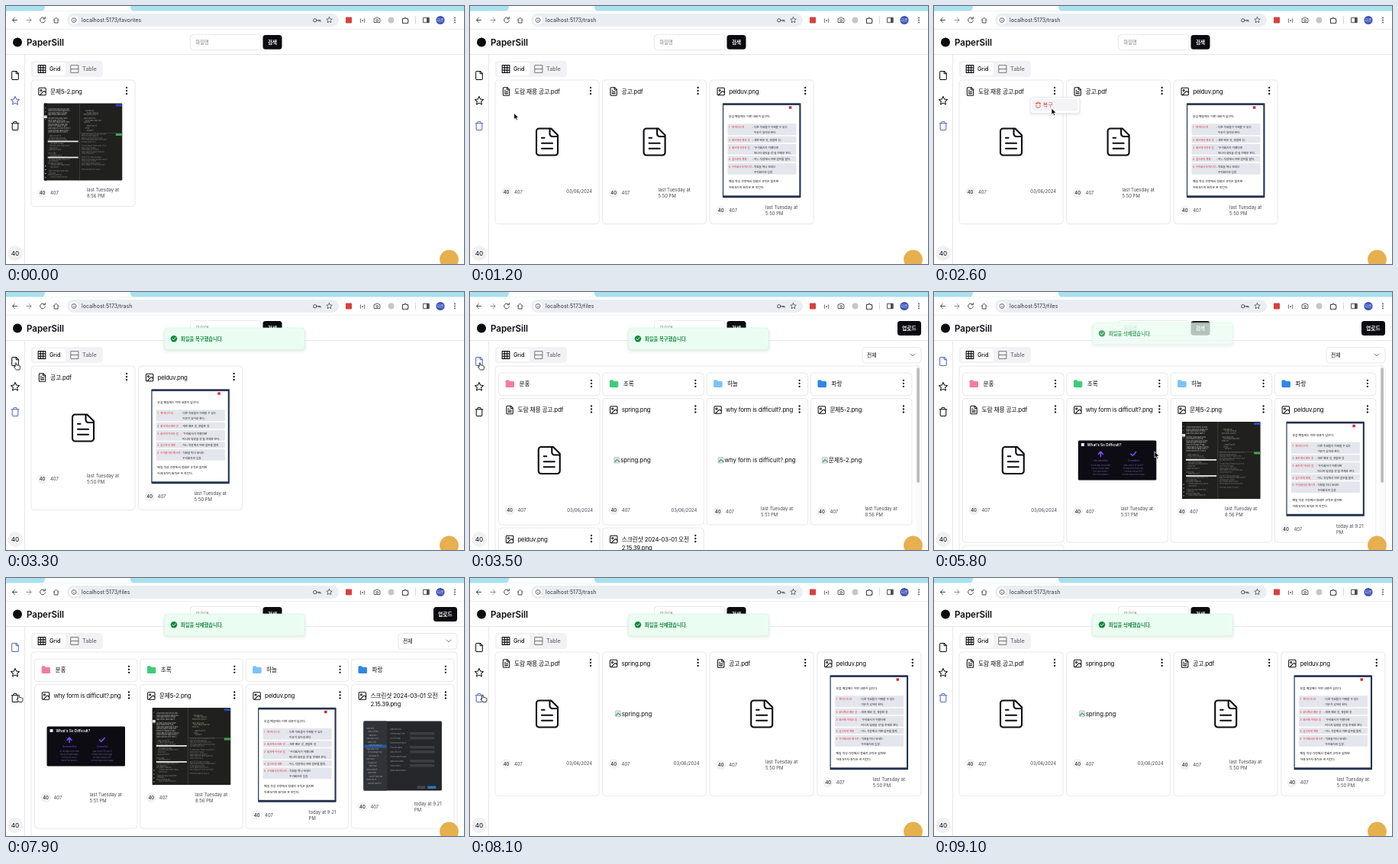
An HTML page for the animation above (9600 ms loop, 600x338 px).

```html
<!DOCTYPE html>
<html lang="ko">
<head>
<meta charset="utf-8">
<title>PaperSill</title>
<style>
html, body { margin: 0; width: 100%; height: 100%; overflow: hidden; background: #fff; }
svg { display: block; width: 100%; height: 100%; font-family: Inter, "Noto Sans CJK KR", "Noto Sans CJK", "Noto Sans KR", sans-serif; }
text { white-space: pre; }
</style>
</head>
<body>
<svg id="stage" viewBox="0 0 600 338" preserveAspectRatio="none">
  <g id="page"></g><g id="menu"></g><g id="toasts"></g><g id="cursor"></g>
</svg>
<script>
const LOOP = 9600;
const INK = '#0b0b10', LINE = '#e3e3e8', BLUE = '#5566c0', RED = '#dc2f35', MUTED = '#44464d';
const OWNER = '407', INITIALS = '40';
const $ = id => document.getElementById(id);

const rect = (x, y, w, h, fill, r = 0, more = '') =>
  `<rect x="${x}" y="${y}" width="${w}" height="${h}" rx="${r}" fill="${fill}" ${more}/>`;
const box = (x, y, w, h, r = 4, fill = '#fff') => rect(x, y, w, h, fill, r, `stroke="${LINE}" stroke-width=".8"`);
const dot = (x, y, r, fill) => `<circle cx="${x}" cy="${y}" r="${r}" fill="${fill}"/>`;
const text = (x, y, size, str, fill = INK, more = '') =>
  `<text x="${x}" y="${y}" font-size="${size}" fill="${fill}" ${more}>${str}</text>`;
const path = (d, stroke, w = 1, more = '') =>
  `<path d="${d}" fill="none" stroke="${stroke}" stroke-width="${w}" stroke-linecap="round" stroke-linejoin="round" ${more}/>`;
const at = (x, y, body) => `<g transform="translate(${x} ${y})">${body}</g>`;
const MID = 'text-anchor="middle"', BOLD = 'font-weight="600"', MEDIUM = 'font-weight="500"';

const SHEET = 'M15 2H6a2 2 0 0 0-2 2v16a2 2 0 0 0 2 2h12a2 2 0 0 0 2-2V7Z M14 2v4a2 2 0 0 0 2 2h4';
const ICONS = {
  file: SHEET,
  doc: SHEET + ' M10 9H8 M16 13H8 M16 17H8',
  star: 'M12 2 15.1 8.3 22 9.3 17 14.1 18.2 21 12 17.8 5.8 21 7 14.1 2 9.3 8.9 8.3Z',
  trash: 'M3 6h18 M19 6v14a2 2 0 0 1-2 2H7a2 2 0 0 1-2-2V6 M8 6V4a2 2 0 0 1 2-2h4a2 2 0 0 1 2 2v2',
  image: 'M5 3h14a2 2 0 0 1 2 2v14a2 2 0 0 1-2 2H5a2 2 0 0 1-2-2V5a2 2 0 0 1 2-2Z M7 9a2 2 0 1 0 4 0 2 2 0 1 0-4 0 M21 15l-3.1-3.1a2 2 0 0 0-2.8 0L6 21',
  grid: 'M3 3h18v18H3Z M3 9h18 M3 15h18 M9 3v18 M15 3v18',
  rows: 'M3 3h18v18H3Z M3 12h18',
  folder: 'M20 20a2 2 0 0 0 2-2V8a2 2 0 0 0-2-2h-7.9a2 2 0 0 1-1.7-.9L9.6 3.9A2 2 0 0 0 7.9 3H4a2 2 0 0 0-2 2v13a2 2 0 0 0 2 2Z'
};
const icon = (name, cx, cy, size, color = INK, w = 2, fill = 'none') =>
  `<g transform="translate(${cx - size / 2} ${cy - size / 2}) scale(${size / 24})">` +
  `<path d="${ICONS[name]}" fill="${fill}" stroke="${color}" stroke-width="${w}" stroke-linecap="round" stroke-linejoin="round"/></g>`;
const dots = (x, y) => [-4, 0, 4].map(d => dot(x, y + d, 1.15, INK)).join('');

// Thumbnails, each about 103 wide
function scribble(seed, count) {
  const words = ['const', 'value', 'return', 'item', 'if', 'the', 'list', 'of', 'map', 'next', 'index'];
  let out = '';
  while (out.length < count) {
    seed = (seed * 16807) % 2147483647;
    out += words[seed % words.length] + ' ';
  }
  return out.slice(0, count);
}

function codeShot() {
  let s = rect(0, 0, 102.5, 101, '#20211f', 1) + rect(0, 0, 4, 101, '#181917') + rect(46.5, 0, .6, 101, '#4b4c48');
  for (let i = 0; i < 36; i++) {
    const y = 8 + i * 2.55, n = (i * 7919) % 23;
    if (i % 9 !== 4) s += text(5.5 + (i > 12 ? n % 4 : 0), y, 2.1, scribble(i + 11, i < 13 ? 31 - n / 4 : 9 + n), i < 13 ? '#c9c9c4' : '#858680');
    if (i < 13) { if (i % 4) s += text(52 + (n % 3) * 2, y, 2.1, scribble(i + 71, 7 + n * .7), '#989c86'); }
    else if (i < 32 && i % 6) s += text(49, y, 2.1, scribble(i + 131, 18 + n * .85), '#7b7d77');
  }
  for (const y of [49, 70]) s += rect(5, y, 40, 1.8, '#e6e6e2');
  for (let i = 0; i < 4; i++) s += dot(2, 6 + i * 5, .7, '#777') + dot(2, 82 + i * 5, .8, '#aaa');
  return s + rect(0, 16, 4, 3.5, '#ddd') + rect(47, 39, 55.5, .5, '#50524c') +
    rect(94, 1, 8, 3, '#2c47c9', .6) + rect(94, 39.5, 8, 3, '#3fa64b', .6);
}

function slide() {
  const purple = '#7a4bf0';
  let s = rect(0, 0, 102.5, 52, '#0d0c13', 1.5) + rect(4, 3.5, 4, 4, '#e9e9ee') +
    text(12, 7.4, 4.7, 'What\'s So Difficult?', '#fff', BOLD) +
    path('M29.5 21v-6m-3 3 3-3.5 3 3.5', purple, 1.6) + path('M69 17.5l2.3 2.5 4.5-5', purple, 1.6) +
    text(29.5, 27.5, 3, 'Uncontrolled', purple, MID) + text(72.5, 27.5, 3, 'Controlled', purple, MID);
  for (let i = 0; i < 4; i++)
    s += text(29.5, 33.5 + i * 4, 2.3, scribble(i + 5, 26 - i * 2), '#6d62a0', MID) +
      text(72.5, 33.5 + i * 4, 2.3, scribble(i + 25, 24 + i), '#6d62a0', MID);
  return s;
}

function memo() {
  const rows = [
    [27, 15, '왜 떠나는지', '다른 직원들이 이해할 수 있는', '이유가 있어야 한다.'],
    [43.5, 8.5, '회사에서 배운 것', '새로 배운 것, 경험한 것.'],
    [53.5, 14, '회사에 아쉬운 점', '\'우리회사가 이랬다면', '떠나지 않았을 것\'을 전제로 쓴다.'],
    [69, 8, '앞으로의 계획', '어느 직장에서 어떤 업무를 할지.'],
    [78.5, 15, '우리회사의 메시지', '직원을 떠나 보내는', '우리회사의 입장.']
  ];
  const size = 3.85;
  let s = rect(0, 0, 102.5, 124, '#24324f', 1) + rect(1.2, 2.6, 99.2, 118.4, '#fff') +
    rect(87, 4, 3.4, 3.4, '#e0202d') + text(8, 18.8, size, '부검 메일에는 이런 내용이 담긴다.', INK, MEDIUM);
  rows.forEach(([y, h, label, a, b], i) => {
    s += rect(6.5, y, 90, h, '#e3e6ec', .8) + text(8, y + 6, 3.3, i + 1, RED) +
      text(12, y + 6, 3.4, label, RED, MEDIUM) + text(39, y + 6, 3.6, ': ' + a, '#222') +
      (b ? text(41, y + 13, 3.6, b, '#222') : '');
  });
  return s + text(8, 104, size, '메일 작성 과정에서 정해진 규칙은 없지만', INK, MEDIUM) +
    text(8, 112, size, '아래 5가지 원칙은 꼭 지킨다.', INK, MEDIUM);
}

function settingsShot() {
  let s = rect(0, 0, 102.5, 91, '#25272b', 1.5) + rect(0, 0, 31, 91, '#303338', 1.5) + rect(1, 31, 29, 4, '#285a9c');
  for (let i = 0; i < 17; i++) s += text(4 + (i % 3) * 1.5, 10 + i * 4.5, 2.3, scribble(i + 41, 9 + (i * 5) % 9), '#a5a7ab');
  for (let i = 0; i < 10; i++)
    s += text(35, 11 + i * 6, 2.3, scribble(i + 91, 12 + (i * 7) % 11), '#9a9ca0') + (i % 3 ? rect(61, 8.5 + i * 6, 32, 3.4, '#3b3e43', .5) : '');
  return s + rect(70, 85, 11, 3.5, '#44474c', .7) + rect(84, 85, 11, 3.5, '#3473c4', .7);
}

// shot: drawing, top: offset in the card, push: extra footer offset
const TUE = time => ['last Tuesday at', time], TODAY = ['today at 9:21', 'PM'], DAY = ['03/06/2024'];
const job = { name: ['도람 채용 공고.pdf'], pdf: true, date: DAY };
const notice = { name: ['공고.pdf'], pdf: true, date: TUE('5:50 PM') };
const spring = { name: ['spring.png'], date: DAY };
const form = { name: ['why form is difficult?.png'], shot: slide(), top: 55, date: TUE('5:51 PM') };
const quiz = { name: ['문제5-2.png'], shot: codeShot(), top: 30.5, date: TUE('8:56 PM') };
const oldMemo = { name: ['pelduv.png'], shot: memo(), top: 30.3, push: 23, date: TUE('5:50 PM') };
const newMemo = { ...oldMemo, date: TODAY };
const capture = { name: ['스크린샷 2024-03-01 오전', '2.15.39.png'], shot: settingsShot(), top: 48, push: 12, date: TODAY };

function card(f, x, y, w, h, loaded) {
  const left = x + (w - 102.5) / 2, push = f.push || 0, two = f.date.length > 1;
  const foot = y + (two ? 148 : 146.3) + push;
  let s = box(x, y, w, h) + icon(f.pdf ? 'doc' : 'image', x + 14.5, y + 15, 12.5) + dots(x + w - 11, y + 14);
  f.name.forEach((n, i) => s += text(x + 25, y + 17.8 + i * 11, 7.8, n, INK, 'letter-spacing="-.2"'));
  if (f.pdf) s += icon('doc', x + w / 2, y + 81, 42, INK, 1.2);
  else if (f.shot && loaded) s += at(left, y + f.top, f.shot);
  else s += rect(left, y + 77, 7, 7.5, '#dfe7ee', 1, 'stroke="#9aa3ad" stroke-width=".6"') +
    path(`M${left + 1} ${y + 83}l2.5-3 3.5 3`, '#58a45c', 1.3) + text(left + 8.4, y + 83.6, 7.8, f.name[0]);
  s += dot(x + 14.5, foot, 6.4, '#f2f2f4') + text(x + 14.5, foot + 2.2, 6, INITIALS, INK, MID) + text(x + 25, foot + 2.2, 5.95, OWNER, MUTED);
  if (!two) return s + text(x + w - 9, foot + 2, 5.95, f.date[0], MUTED, 'text-anchor="end"');
  const dx = x + w - (f.date === TODAY ? 52 : w * .464);
  return s + f.date.map((d, i) => text(dx, foot - 1.9 + i * 8, 5.95, d, MUTED)).join('');
}

function cards(list, x, y, w, pitch, loaded) {
  let s = '';
  for (let i = 0; i < list.length; i += 4) {
    const row = list.slice(i, i + 4);
    const h = 165.5 + (loaded ? Math.max(...row.map(f => f.push || 0)) : 0);
    s += row.map((f, k) => card(f, x + k * pitch, y, w, h, loaded)).join('');
    y += h + 4;
  }
  return s;
}

const plainPage = (list, loaded = true) => cards(list, 33, 97, 136, 140.6, loaded);

function filesPage(list, loaded = true) {
  const scroll = list.length > 4, w = scroll ? 132.5 : 134.5, pitch = scroll ? 136.3 : 138.3;
  const folders = [['분홍', '#f27f9b'], ['초록', '#3ecb7a'], ['하늘', '#7cc3f6'], ['파랑', '#2e86e2']];
  let s = box(33, 97, 558, 260, 4) + box(514, 72.5, 77, 20.5) + text(520, 85.2, 6.8, '전체') +
    path('M577 81l3 3 3-3', '#777', .9) + rect(560, 38, 31, 19, INK, 3.5) + text(575.5, 50, 6.8, '업로드', '#fff', MID + ' ' + BOLD);
  folders.forEach(([name, color], i) => {
    const x = 37.5 + i * pitch;
    s += box(x, 106, w, 29.5) + icon('folder', x + 14.8, 120.4, 12.5, color, 2, color) + text(x + 27, 122.9, 7.6, name) + dots(x + w - 11, 119.8);
  });
  if (scroll) s += rect(584, 98, 6.6, 240, '#fafafa') + rect(585.2, 99, 3.8, 151, '#bdbdc0', 1.9);
  return s + cards(list, 37.5, 139.5, w, pitch, loaded);
}

function chrome() {
  const g = '#4a4d52';
  return rect(0, 0, 600, 338, '#fff') + rect(0, 0, 600, 6.5, '#a9e1ee') + path('M47 6.5q4 0 4-6.5h112q0 6.5 4 6.5Z', 'none', 0, 'style="fill:#fff"') +
    rect(80, 10, 356, 17, '#eaeef3', 8.5) + dot(89, 18.5, 6, '#fff') +
    path('M14.5 18.5h-6m2.8-3-2.8 3 2.8 3', g) + path('M27 18.5h6m-2.8-3 2.8 3-2.8 3', '#8b8e93') +
    path('M51 16.7a3.4 3.4 0 1 0 .4 2.6M51.3 14.5v2.4h-2.4', g) + path('M62 18.5l3.6-3.3 3.6 3.3M63.2 18v4h4.8v-4', g) +
    path('M92 18.5a3 3 0 1 0-6 0 3 3 0 1 0 6 0M89 18.3v1.6M89 16.8v.1', g, .8) +
    path('M407 18.7a2.2 2.2 0 1 0-4.4 0 2.2 2.2 0 1 0 4.4 0h5v1.7m-2-1.7v1.4', g) + icon('star', 423.5, 18.3, 9, g, 2.2) +
    rect(445, 14.5, 8, 8, '#d8403c', 1) + text(467, 20.8, 6.2, '(•)', g, MID + ' ' + BOLD) +
    path('M482.5 16.3h1.6l1-1.3h2.2l1 1.3h1.6v5.2h-7.4Z M487.6 18.8a1.4 1.4 0 1 0-2.8 0 1.4 1.4 0 1 0 2.8 0', g, .9) +
    dot(504.5, 18.5, 4, '#c5c7ca') +
    path('M519.5 16.5h2.3a1.2 1.2 0 0 1 2.4 0h2.3v2a1.2 1.2 0 0 1 0 2.2v1.8h-7Z', g, 1.2) +
    path('M536.5 14v9', '#b5dce6', .9) + path('M547 15.3h7v6.4h-7Z', g) + rect(551, 15, 3.5, 7, g) +
    dot(569, 18.5, 5.6, '#3f55b8') + text(569, 20.2, 4.6, '다온', '#fff', MID) + [-3, 0, 3].map(d => dot(588, 18.5 + d, .9, g)).join('') +
    rect(0, 30, 600, .8, '#e9ebee') + dot(15, 47.5, 6, INK) + text(27, 51.8, 11.5, 'PaperSill', INK, BOLD) +
    box(241.5, 37.5, 92.5, 20) + text(248.5, 50, 6.3, '파일명', '#777a82') + rect(336.5, 38, 25, 18.8, INK, 3.5) +
    text(349, 49.9, 6.6, '검색', '#fff', MID + ' ' + BOLD) + rect(0, 63, 600, .8, LINE) + rect(24, 63, .8, 275, LINE) +
    dot(12, 324, 10, '#f1f1f4') + text(12, 327, 8.2, INITIALS, INK, MID) +
    rect(33, 72, 94, 21, '#f2f2f5', 4) + rect(35, 74, 43, 17, '#fff', 3) + icon('grid', 47, 82.5, 13, INK, 1.9) + text(57, 85.1, 7.2, 'Grid', INK, MEDIUM) +
    icon('rows', 90, 82.5, 13, '#6a6c75', 1.7) + text(100, 85.1, 7.2, 'Table', '#6a6c75', MEDIUM);
}

const BASE = chrome(), BADGE = dot(580.5, 332, 12.4, '#e5b04d');
const NAV = { files: ['file', 91], favorites: ['star', 124], trash: ['trash', 157] };
const screen = (start, route, body) => ({
  start,
  html: BASE + text(99, 21, 7, 'localhost:5173/' + route, '#33363b') +
    Object.entries(NAV).map(([k, [name, y]]) => icon(name, 12, y, 13, k === route ? BLUE : INK, 1.9)).join('') + body + BADGE
});
const all = [job, spring, form, quiz, newMemo, capture];
const screens = [
  screen(0, 'favorites', plainPage([quiz])),
  screen(800, 'trash', plainPage([job, notice, oldMemo], false)),
  screen(1100, 'trash', plainPage([job, notice, oldMemo])),
  screen(2800, 'trash', plainPage([notice, oldMemo])),
  screen(3400, 'files', filesPage(all, false)),
  screen(3800, 'files', filesPage(all)),
  screen(5700, 'files', filesPage(all.filter(f => f !== spring))),
  screen(7300, 'files', filesPage(all.slice(2))),
  screen(8100, 'trash', plainPage([job, spring, notice, oldMemo]))
];

const menus = [
  { from: 1900, to: 2700, x: 126, y: 119.5, h: 21, items: [['trash', '복구', 10, RED]] },
  { from: 4900, to: 5680, x: 262.5, y: 162, h: 58 },
  { from: 6700, to: 7250, x: 126.5, y: 162, h: 58 }
];
const FILE_ITEMS = [['file', '저장', 10, INK], ['star', '싫어요', 26.5, INK], ['trash', '삭제', 47.5, RED]];

function drawMenu(m, t, cy) {
  const p = Math.min(1, (t - m.from) / 80), w = 65, items = m.items || FILE_ITEMS;
  let s = rect(-1, 1.5, w + 2, m.h + 1.5, '#000', 4, 'opacity=".06"') + box(0, 0, w, m.h);
  if (!m.items) s += rect(0, 37, w, .7, LINE);
  for (const [name, label, y, color] of items) {
    if (Math.abs(cy + 2 - m.y - y) < 8) s += rect(2.5, y - 7.7, w - 5, 15.4, '#f3f3f6', 2.5);
    s += icon(name, 10.5, y, 8.5, color, 1.9) + text(16.8, y + 2.6, 6.9, label, color);
  }
  return `<g opacity="${p}" transform="translate(${m.x} ${m.y}) translate(${w / 2 * (1 - p) * .05} 0) scale(${.95 + .05 * p})">${s}</g>`;
}

const toasts = [
  [2900, 4700, '파일을 복구했습니다.'],
  [5700, 7650, '파일을 삭제했습니다.'],
  [7400, LOOP, '파일을 삭제했습니다.']
];
const clamp = v => Math.max(0, Math.min(1, v));
const easeOut = v => 1 - (1 - v) ** 2;

function drawToast([from, to, label], t) {
  const p = easeOut(clamp((t - from) / 200)) * (1 - easeOut(clamp((t - to) / 200)));
  if (p <= 0) return '';
  return `<g opacity="${p}" transform="translate(207.5 ${47 - 28 * (1 - p)})">` +
    rect(-3, 1, 190, 33, '#000', 7, 'opacity=".025"') + rect(-1, 1, 186, 30, '#000', 5, 'opacity=".04"') +
    rect(0, 0, 184, 28.5, '#ebfdf2', 4, 'stroke="#cdf7de" stroke-width=".7"') +
    dot(12.5, 14.2, 4.2, '#118a3c') + path('M10.6 14.3l1.4 1.5 2.5-2.9', '#fff', .9) +
    text(21.5, 16.6, 6.3, label, '#118a3c', BOLD) + '</g>';
}

// time, x, y of the pointer tip
const track = [
  [100, 560, 2], [700, 14, 154], [1000, 14, 154], [1550, 158, 109], [1900, 158, 109], [2200, 154, 134], [2750, 154, 134],
  [3300, 13, 92.5], [3600, 13, 92.5], [4400, 385, 190], [4750, 295, 152], [5000, 295, 152], [5400, 290, 210], [5800, 289, 209],
  [6500, 159, 152], [6800, 159, 152], [7150, 154, 209], [7300, 154, 209], [7800, 16.5, 153], [8600, 16.5, 153], [9060, 598, 4]
];
const handTimes = [[600, 1050], [1500, 1950], [3200, 3650], [4700, 5050], [5350, 5700], [6450, 6850], [7100, 7320], [7700, 8650]];

function pointer(t) {
  let i = 0;
  while (i < track.length - 2 && t > track[i + 1][0]) i++;
  const [t0, x0, y0] = track[i], [t1, x1, y1] = track[i + 1];
  const u = clamp((t - t0) / (t1 - t0)), k = u * u * (3 - 2 * u);
  return [x0 + (x1 - x0) * k, y0 + (y1 - y0) * k];
}
const ARROW = '<path d="M0 0V8.2L1.9 6.5 3.2 9.4 4.6 8.8 3.3 6H5.9Z" fill="#000" stroke="#fff" stroke-width=".7"/>';
const HAND = '<path d="M-.9 .8Q0-.3 .8 .8V3.4Q2 2.7 2.5 3.7 3.7 3.2 4.1 4.2 5.5 4 5.5 5.2V7Q5.3 8.3 4.6 9.5H.3Q-.8 7.8-2.5 6 -2.6 4.6-.9 5.6Z" fill="#fff" stroke="#000" stroke-width=".8"/>';

let shown = null;
function update(t) {
  const now = screens.findLast(s => t >= s.start);
  if (now !== shown) $('page').innerHTML = (shown = now).html;
  const [x, y] = pointer(t);
  const open = menus.find(m => t >= m.from && t < m.to);
  $('menu').innerHTML = open ? drawMenu(open, t, y) : '';
  $('toasts').innerHTML = toasts.map(o => drawToast(o, t)).join('');
  const hand = handTimes.some(([a, b]) => t >= a && t < b);
  $('cursor').innerHTML = t > track[0][0] && t < 9060 ? at(x, y, hand ? HAND : ARROW) : '';
}

const begin = performance.now();
function tick() {
  update((performance.now() - begin) % LOOP);
  requestAnimationFrame(tick);
}
tick();
</script>
</body>
</html>
```
